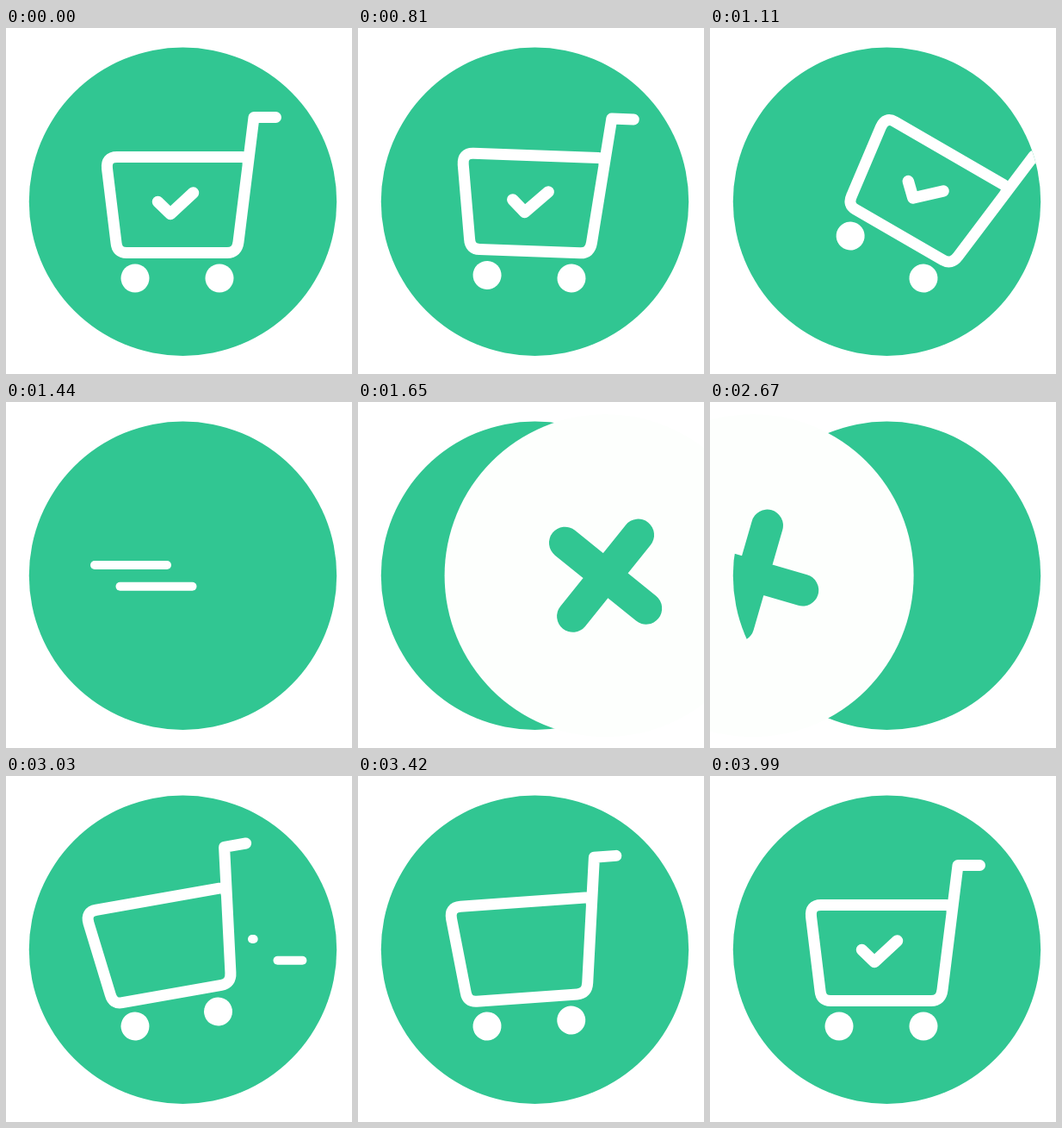
An HTML page with a canvas for the animation above (4020 ms loop, 402 by 401 pixels).

```html
<!DOCTYPE html>
<html lang="en">
<head>
<meta charset="utf-8">
<title>Shopping cart</title>
<style>
html, body { margin: 0; width: 100%; height: 100%; overflow: hidden; background: #fff; }
canvas { display: block; }
</style>
</head>
<body>
<canvas id="stage" width="402" height="401"></canvas>
<script>
const ctx = document.getElementById('stage').getContext('2d');
const GREEN = '#31c692', WHITE = '#fdfffd';
const LOOP = 4020, STEP = 30;
const CX = 205.5, CY = 201.2, RADIUS = 178.7;
const WHEEL_Y = 290, FRONT_X = 150, REAR_X = 248;

const basket = new Path2D('M313.5 103.5H288L270 248Q268.5 260.5 257 260.5H140Q129 260.5 128 249L117.5 163Q116 149.5 129 149.5H274Q282 149.5 281 158');
const check = new Path2D('M176.5 201.5L191 215.5L217.5 191');
const plus = new Path2D('M-60.5 0H60.5M0-60.5V60.5');
const rim = new Path2D();
rim.arc(CX, CY, RADIUS, 0, 2 * Math.PI);

const progress = (t, start, end) => Math.min(1, Math.max(0, (t - start) / (end - start)));
const easeIn = (p, power) => p ** power;
const easeOut = (p, power) => 1 - (1 - p) ** power;
const bump = (t, start, end) => Math.sin(Math.PI * progress(t, start, end)) ** 2;
const backOut = p => 1 + 2.7 * (p - 1) ** 3 + 1.7 * (p - 1) ** 2;

function stroke(path, width, color) {
  ctx.lineWidth = width;
  ctx.strokeStyle = color;
  ctx.stroke(path);
}

function disc(x, y, r, color) {
  ctx.fillStyle = color;
  ctx.beginPath();
  ctx.arc(x, y, r, 0, 2 * Math.PI);
  ctx.fill();
}

function scaleAbout(x, y, s) {
  ctx.translate(x, y);
  ctx.scale(s, s);
  ctx.translate(-x, -y);
}

function drawCart(shift, degrees, pivotX, bodyScale, checkScale) {
  ctx.save();
  ctx.clip(rim);
  ctx.translate(shift + pivotX, WHEEL_Y);
  ctx.rotate(degrees * Math.PI / 180);
  ctx.translate(-pivotX, -WHEEL_Y);
  disc(FRONT_X, WHEEL_Y, 16.5, '#fff');
  disc(REAR_X, WHEEL_Y, 16.5, '#fff');
  scaleAbout(214, 182, bodyScale);
  stroke(basket, 13, '#fff');
  if (checkScale > 0) {
    scaleAbout(197, 203, checkScale);
    stroke(check, 13.5, '#fff');
  }
  ctx.restore();
}

function speedLine(x, y, length) {
  if (length <= 0) return;
  const line = new Path2D();
  const radius = Math.min(5, length / 2);
  line.moveTo(x + radius, y);
  line.lineTo(x + length - radius + 0.01, y);
  stroke(line, 2 * radius, '#fff');
}

function drawLines(x, first, second) {
  ctx.save();
  ctx.clip(rim);
  speedLine(x, 189, first);
  speedLine(x + 29.5, 213.7, second);
  ctx.restore();
}

function drawPlus(shift) {
  disc(CX + shift, CY, 187, WHITE);
  ctx.save();
  ctx.clip(rim);
  ctx.translate(CX + shift, CY);
  ctx.rotate(shift / 380 * Math.PI);
  stroke(plus, 37, GREEN);
  ctx.restore();
}

function leaving(t) {
  const tilt = 30 * easeIn(progress(t, 600, 1110), 3);
  const shift = -420 * easeIn(progress(t, 1110, 1410), 2);
  if (t < 1410) drawCart(shift, tilt, REAR_X, 1 - 0.03 * bump(t, 45, 585), 1);
  if (t > 1260) drawLines(98 - 1.9 * (t - 1440), 94, 94);
}

function arriving(t) {
  const shift = 310 * (1 - easeOut(progress(t, 2690, 2940), 2));
  const tilt = t < 3205
    ? -17.7 * easeOut(progress(t, 2940, 3205), 2)
    : -17.7 * (1 - easeIn(progress(t, 3205, 3450), 2));
  const pop = progress(t, 3450, 3700);
  drawCart(shift, tilt, FRONT_X, 1 + 0.033 * bump(t, 3450, 3990), pop && backOut(pop));
  drawLines(281 + shift, 94 * (1 - progress(t, 2910, 3047)), 94 * (1 - progress(t, 2945, 3090)));
}

function draw(t) {
  ctx.clearRect(0, 0, 402, 401);
  ctx.lineCap = ctx.lineJoin = 'round';
  disc(CX, CY, RADIUS, GREEN);
  if (t < 1650) leaving(t);
  if (t > 2680) arriving(t);
  if (t > 1470 && t < 2830) {
    drawPlus(t < 2200
      ? 380 * (1 - easeOut(progress(t, 1470, 1920), 3))
      : -380 * easeIn(progress(t, 2385, 2830), 2));
  }
}

const origin = performance.now();
function tick() {
  const t = (performance.now() - origin) % LOOP;
  draw(Math.floor(t / STEP) * STEP);
  requestAnimationFrame(tick);
}
tick();
</script>
</body>
</html>
```
